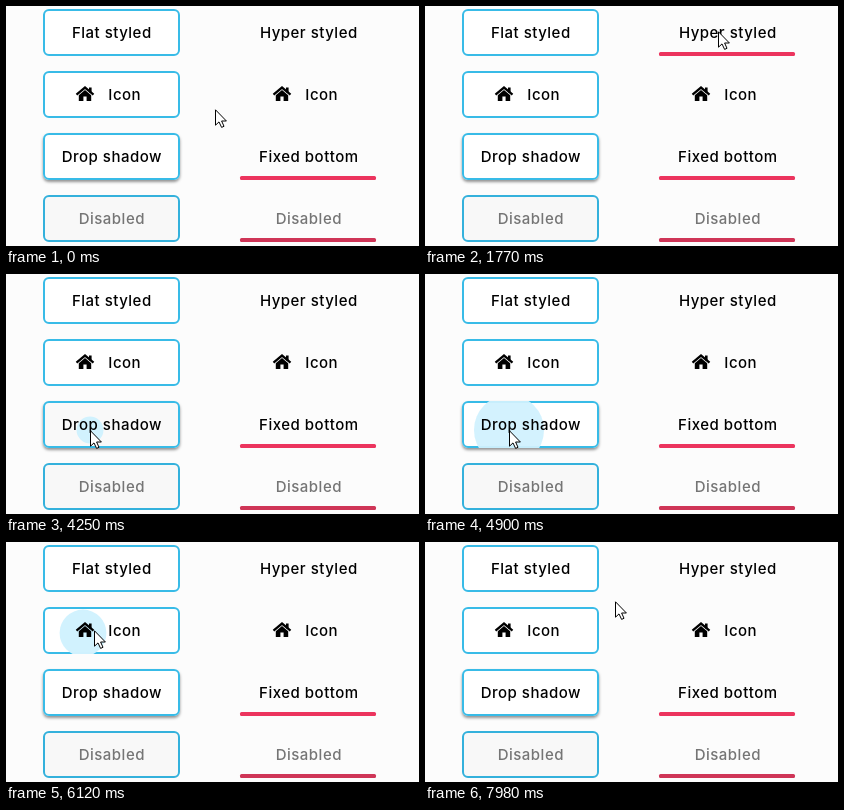
Recreate the animation shown at these times as an HTML page with a canvas. Size 413 by 240 pixels, loop 8.61 s.

```html
<!DOCTYPE html>
<html lang="en">
<head>
<meta charset="utf-8">
<title>Button styles</title>
<style>
html, body { margin: 0; width: 100%; height: 100%; overflow: hidden; background: #fcfcfc; }
canvas { display: block; }
</style>
</head>
<body>
<canvas id="stage" width="413" height="240"></canvas>
<script>
const ctx = document.getElementById('stage').getContext('2d');
const LOOP = 8610, W = 137, H = 47, LEFT = 37, RIGHT = 234;
const INK = '#000', MUTED = '#757575';
const FLAT = ['Flat styled', 'Icon', 'Drop shadow', 'Disabled'];
const HYPER = ['Hyper styled', 'Icon', 'Fixed bottom', 'Disabled'];

// The pointer rests between moves: begin, end, x, y
const HOME = [209, 103];
const MOVES = [
  [190, 860, 290, 85], [950, 1570, 293, 25],
  [1900, 2400, 286, 74], [2400, 2800, 216, 72], [2800, 3110, 159, 39],
  [3250, 3880, 84, 156], [4910, 5300, 155, 100], [5300, 5860, 76, 91],
  [5960, 6120, 88, 88], [6120, 6480, 75, 30],
  [7360, 7720, 171, 55], [7760, 7980, 190, 59]
];
const CLICKS = [4170, 4690, 5980, 6400, 6880];
const RIPPLE_TIME = 420, RIPPLE_SPEED = 0.166;

const clamp = v => Math.max(0, Math.min(1, v));
const ease = v => { v = clamp(v); return v * v * (3 - 2 * v); };
const rowTop = row => 3 + 62 * row;

function pointerAt(t) {
  let [x, y] = HOME;
  for (const [begin, end, tx, ty] of MOVES) {
    const u = ease((t - begin) / (end - begin));
    x += (tx - x) * u;
    y += (ty - y) * u;
  }
  return [Math.round(x), Math.round(y)];
}

function inside([x, y], left, row) {
  const top = rowTop(row);
  return x >= left && x < left + W && y >= top && y < top + H;
}

// Share of the last `time` ms the pointer spent on a button
function hover(left, row, t, time) {
  const n = 40;
  let hits = 0;
  for (let i = 0; i < n; i++) {
    if (inside(pointerAt(t - time * i / n), left, row)) hits++;
  }
  return ease(hits / n);
}

function box(x, y, w, h, r) {
  ctx.beginPath();
  ctx.roundRect(x, y, w, h, r);
}

function poly(points) {
  ctx.beginPath();
  points.forEach(([x, y]) => ctx.lineTo(x, y));
}

function label(text, left, row) {
  const icon = row === 1;
  ctx.font = '500 15px Inter, "Open Sans", sans-serif';
  ctx.letterSpacing = '0.5px';
  ctx.textAlign = icon ? 'left' : 'center';
  ctx.fillStyle = row === 3 ? MUTED : INK;
  ctx.fillText(text, left + (icon ? 65.3 : 68.8), rowTop(row) + 29);
  if (icon) house(left + 42, rowTop(row) + 15);
}

function house(x, y) {
  ctx.save();
  ctx.translate(x, y);
  ctx.fillStyle = ctx.strokeStyle = INK;
  ctx.lineWidth = 2.3;
  poly([[-8.5, 8.6], [0, 1.5], [8.5, 8.6]]);
  ctx.stroke();
  ctx.fillRect(4, 1.5, 2.6, 5);
  ctx.beginPath();
  ctx.moveTo(0, 4);
  for (const s of [1, -1]) {
    const side = [[6.2, 9.2], [6.2, 15], [1.6, 15], [1.6, 10.6]];
    (s > 0 ? side : side.reverse()).forEach(([px, py]) => ctx.lineTo(s * px, py));
  }
  ctx.fill();
  ctx.restore();
}

function ripples(row, t) {
  for (const click of CLICKS) {
    const age = t - click, p = age / RIPPLE_TIME;
    const at = pointerAt(click);
    if (p <= 0 || p >= 1 || !inside(at, LEFT, row)) continue;
    ctx.save();
    box(LEFT, rowTop(row), W, H, 6);
    ctx.clip();
    ctx.globalAlpha = 1 - p ** 4;
    ctx.fillStyle = '#d1f2fe';
    ctx.beginPath();
    ctx.arc(...at, age * RIPPLE_SPEED, 0, Math.PI * 2);
    ctx.fill();
    ctx.restore();
  }
}

function flatButton(text, row, t) {
  const top = rowTop(row), off = row === 3;
  const fresh = 1 - ease((t - CLICKS[0]) / 170);
  const g = off ? 248 : Math.round(255 - 11 * fresh * hover(LEFT, row, t, 100));
  ctx.save();
  if (row === 2) {
    ctx.shadowColor = 'rgba(0,0,0,0.42)';
    ctx.shadowBlur = 3;
    ctx.shadowOffsetY = 2;
  }
  ctx.fillStyle = `rgb(${g},${g},${g})`;
  box(LEFT, top, W, H, 6);
  ctx.fill();
  ctx.restore();
  ctx.strokeStyle = off ? '#34b1dc' : '#38bbe7';
  ctx.lineWidth = 2;
  box(LEFT + 1, top + 1, W - 2, H - 2, 5);
  ctx.stroke();
  ripples(row, t);
  label(text, LEFT, row);
}

function barButton(text, row, t) {
  const w = 136 * (row > 1 ? 1 : hover(RIGHT, row, t, 270));
  if (w > 0) {
    ctx.fillStyle = row === 3 ? '#cf3557' : '#ec345e';
    box(RIGHT + 68 - w / 2, rowTop(row) + 43, w, 4, Math.min(1.5, w / 2));
    ctx.fill();
  }
  label(text, RIGHT, row);
}

function pointer([x, y]) {
  ctx.save();
  ctx.translate(x, y);
  poly([[0.5, 0.8], [0.5, 16.2], [4, 12.9], [6.6, 18.4],
    [9, 17.3], [6.6, 12], [11.4, 12]]);
  ctx.closePath();
  ctx.fillStyle = '#fff';
  ctx.fill();
  ctx.strokeStyle = '#000';
  ctx.lineWidth = 1;
  ctx.stroke();
  ctx.restore();
}

function draw(t) {
  ctx.fillStyle = '#fcfcfc';
  ctx.fillRect(0, 0, 413, 240);
  FLAT.forEach((text, row) => flatButton(text, row, t));
  HYPER.forEach((text, row) => barButton(text, row, t));
  pointer(pointerAt(t));
}

const start = performance.now();
function tick() {
  draw((performance.now() - start) % LOOP);
  requestAnimationFrame(tick);
}
tick();
</script>
</body>
</html>
```
